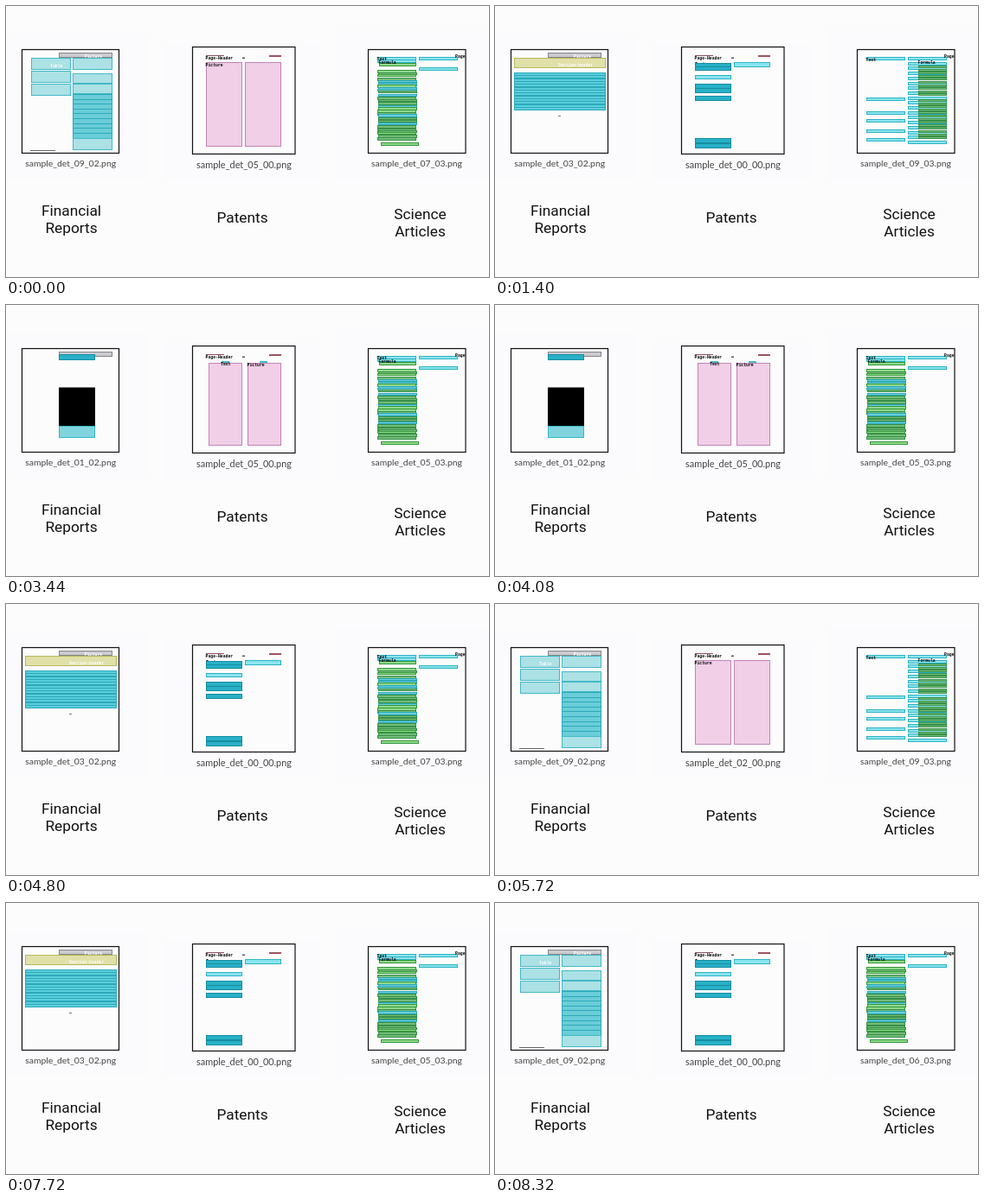
Animation, 558 px wide and 314 px high, one loop 8360 ms. Source, as an HTML page with a canvas:

```html
<!DOCTYPE html>
<html lang="en">
<head>
<meta charset="utf-8">
<title>Page layout samples</title>
<style>
html, body { margin: 0; width: 558px; height: 314px; overflow: hidden; background: #fdfcfd; }
canvas { display: block; }
</style>
</head>
<body>
<canvas id="stage" width="558" height="314"></canvas>
<script>
const c = document.getElementById('stage').getContext('2d');
const LOOP = 8360;
const CYAN = ['#ace1e5', '#42b9c6'], TEAL = ['#6acdd8', '#2ba9b9'], AQUA = ['#8be4ed', '#2cb3c4'];
const DEEP = ['#28b0c7', '#168da1'], GREEN = ['#8fd98c', '#35983a'], MOSS = ['#73bd78', '#378f48'];
const PINK = ['#f0cfe7', '#c283b5'], GREY = ['#cbcbcf', '#858588'], OLIVE = ['#e0e0a9', '#b8b85c'];

function fill(color, x, y, w, h) {
  c.fillStyle = color;
  c.fillRect(x, y, w, h);
}
function box([inside, edge], x, y, w, h) {
  fill(inside, x, y, w, h);
  c.strokeStyle = edge;
  c.lineWidth = 1;
  c.strokeRect(x + .5, y + .5, w - 1, h - 1);
}
// Evenly spaced boxes of height h.
function rows(colors, x, w, from, count, h, step = h) {
  for (let i = 0; i < count; i++) box(colors, x, Math.round(from + i * step), w, h);
}
function seeded(seed) {
  return () => (seed = seed * 16807 % 2147483647) / 2147483647;
}
// Text lines of uneven height, overlapping or leaving small gaps.
function scatter(palette, x, w, from, to, step, seed) {
  const rnd = seeded(seed);
  for (let y = from; y < to - 3; y += step * (.7 + .6 * rnd())) {
    const colors = palette[rnd() * palette.length | 0];
    box(colors, x + (rnd() * 2 | 0), Math.round(y), w, 3 + (rnd() * 2 | 0));
  }
}
function text(str, x, y, font, color, align = 'left') {
  c.font = font;
  c.fillStyle = color;
  c.textAlign = align;
  c.fillText(str, x, y);
}
function tag(str, x, y, color = '#000') {
  text(str, x, y, 'bold 4.8px "Liberation Mono", monospace', color);
}

// Financial reports
function reportHead() {
  box(GREY, 61, 54, 62, 6);
  tag('Picture', 91, 60, '#fff');
}
const reports = {
  '09'() {
    reportHead();
    rows(CYAN, 29, 46, 60, 3, 14, 15);
    box(CYAN, 77, 60, 46, 14);
    rows(CYAN, 77, 46, 78, 2, 12);
    rows(TEAL, 77, 46, 102, 9, 7, 5.6);
    box(CYAN, 77, 153, 46, 14);
    tag('Table', 51, 71, '#fff');
    fill('#666', 28, 167, 29, 1);
  },
  '01'() {
    box(GREY, 61, 54, 62, 6);
    box(DEEP, 61, 57, 42, 7);
    fill('#000', 61, 95.5, 42, 45);
    box(['#80d4de', '#35b7c6'], 61, 140, 42, 14);
  },
  '03'() {
    reportHead();
    box(OLIVE, 22, 60, 106, 12);
    tag('Section-header', 73, 70, '#fff');
    rows(['#5bcedb', '#2ba9b9'], 22, 106, 77, 13, 4, 3.33);
    fill('#777', 73, 127, 3, 1);
  }
};

// Patents
function patentHead() {
  fill('#8b5060', 231, 57, 21, 1);
  tag('Page-Header', 230.5, 61.5);
  fill('#555', 273, 59.5, 3, 1.5);
  fill('#9c5360', 304, 57, 14, 2);
}
function figures() {
  patentHead();
  for (const x of [231, 276]) box(PINK, x, 65, 42, 98);
  tag('Picture', 230.5, 70);
}
const patents = {
  '00'() {
    patentHead();
    tag('Text', 231, 69);
    rows(DEEP, 231, 42, 66, 2, 5, 4);
    box(AQUA, 231, 80, 42, 5);
    rows(DEEP, 231, 42, 90, 2, 6, 5);
    box(DEEP, 231, 104, 42, 6);
    rows(DEEP, 231, 42, 153, 2, 6);
    box(AQUA, 276, 65, 42, 6);
  },
  '02': figures,
  '03'() {
    patentHead();
    tag('Text', 230.5, 69.5);
    for (const y of [66, 77, 81, 95, 98, 132, 142]) rows(['#55cad9', '#1aa3b7'], 231, 42, y, 2, 5, 4);
    rows(TEAL, 231, 42, 110, 2, 6, 13);
    rows(AQUA, 231, 42, 154, 2, 5, 7.5);
    rows(AQUA, 276, 42, 65, 2, 5, 4);
  },
  '05'(time) {
    if (time < 840) return figures();
    patentHead();
    for (const x of [249, 293]) fill('#46bac5', x, 65, 9, 2);
    for (const x of [234, 279]) box(PINK, x, 67, 39, 96);
    tag('Text', 248, 70);
    tag('Picture', 278.5, 71);
  }
};

// Science articles
function formulas() {
  rows(AQUA, 429, 45, 59, 2, 4, 3);
  box(GREEN, 431, 66, 43, 4);
  scatter([GREEN, MOSS, TEAL, MOSS], 429, 45, 74, 157, 2.8, 71);
  box(GREEN, 433, 158, 44, 4);
  rows(AQUA, 477, 45, 59, 2, 4, 12);
  tag('Text', 428.5, 63);
  tag('Formula', 430.5, 66.5);
  tag('Page', 519, 59.5);
}
const articles = {
  '05': formulas, '06': formulas, '07': formulas,
  '09'() {
    for (const y of [59, 106, 122, 131, 143, 153]) box(AQUA, 429, y, 45, 4);
    rows(AQUA, 477, 45, 59, 18, 4, 5.7);
    rows(MOSS, 489, 33, 69, 10, 3, 3.6);
    rows(MOSS, 489, 33, 108, 13, 3, 3.6);
    tag('Text', 428.5, 63.5);
    tag('Formula', 488.5, 67);
    tag('Page', 519, 59.5);
  },
  '01'() {
    box(['#8a8a8a', '#333'], 422, 54, 10, 13);
    tag('Text', 422, 59);
    fill('#1f8a22', 431, 54, 101, 13.5);
    fill('#2e8f31', 431, 67, 4, 103);
    fill('#a5dca4', 432.5, 68, 1, 102);
  }
};

// Each plan lists [end time, page]; the last end is the period.
const columns = [
  { pages: reports, suffix: '02', frame: [18.5, 50.5, 112, 120], panel: [0, 33, 162, 167],
    label: [74.7, 185.5, 10.4], title: [75.5, 243, 'Financial', 'Reports'],
    plan: [[240, '09'], [1220, '01'], [2100, '03'], [2940, '09']] },
  { pages: patents, suffix: '00', frame: [215.5, 47.5, 118.5, 124], panel: [182, 43, 182, 158],
    label: [275, 187.5, 10.9], title: [273, 251, 'Patents'],
    plan: [[840, '05'], [1680, '00'], [2520, '02'], [3360, '03']] },
  { pages: articles, suffix: '03', frame: [418.5, 50.5, 112.5, 120], panel: [382, 28, 176, 174],
    label: [474.5, 185.5, 10.4], title: [478.5, 247, 'Science', 'Articles'],
    plan: [[840, '07'], [2100, '09'], [3280, '01'], [4100, '05'], [4200, '06']] }
];

function drawColumn({ pages, suffix, frame, panel, label, title, plan }, time) {
  const t = time % plan.at(-1)[0];
  const id = plan.find(([end]) => t < end)[1];
  fill('#fbfafc', ...panel);
  fill('#fdfcfd', ...frame);
  c.save();
  c.beginPath();
  c.rect(...frame);
  c.clip();
  pages[id](time);
  c.restore();
  c.strokeStyle = '#111';
  c.lineWidth = 1.2;
  c.strokeRect(...frame);
  const [lx, ly, size] = label;
  text(`sample_det_${id}_${suffix}.png`, lx, ly, `${size}px Lato, sans-serif`, '#444', 'center');
  const [tx, ty, ...lines] = title;
  lines.forEach((line, i) => text(line, tx, ty + i * 20.4, '17.3px Roboto, sans-serif', '#111', 'center'));
}

function draw() {
  const time = performance.now() % LOOP;
  fill('#fdfcfd', 0, 0, 558, 314);
  for (const col of columns) drawColumn(col, time);
  requestAnimationFrame(draw);
}
draw();
</script>
</body>
</html>
```
